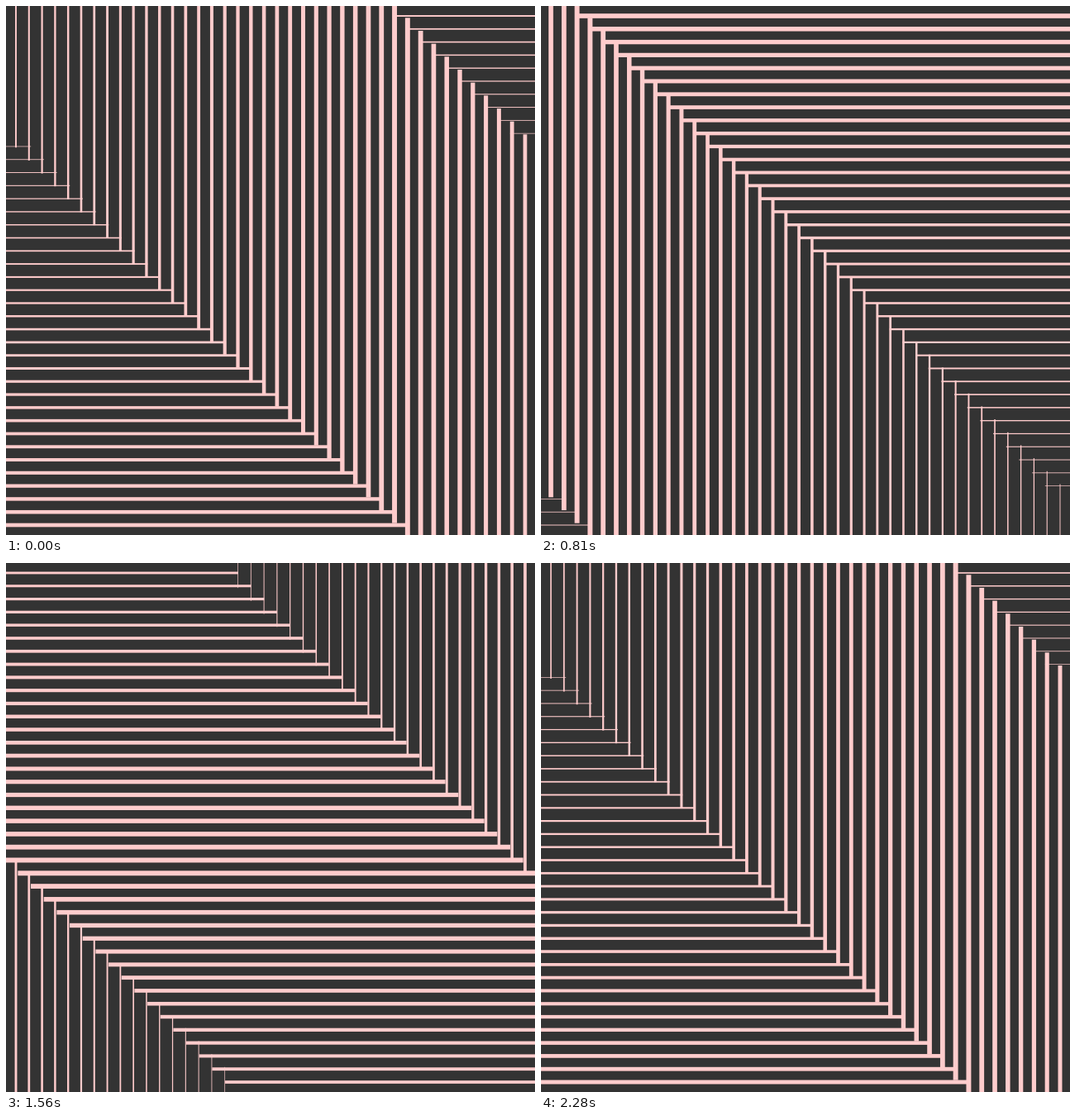
Write an HTML page with a canvas that moves like this. It is 640 px wide and 640 px high and loops after 2310 ms.

```html
<!DOCTYPE html>
<html lang="en">
<head>
<meta charset="utf-8">
<title>Woven lines</title>
<style>
  html, body { margin: 0; width: 100%; height: 100%; overflow: hidden; background: #333; }
  canvas { display: block; width: 640px; height: 640px; }
</style>
</head>
<body>
<canvas id="stage" width="640" height="640"></canvas>
<script>
const ctx = document.getElementById('stage').getContext('2d');

const COUNT = 40;
const MARGIN = 12;
const GAP = (640 - 2 * MARGIN) / (COUNT - 1);
const CYCLE = 2 * (COUNT - 1);
const STEP_MS = 30;
const STEPS = 77;

const THICK = 6;
const THIN = 0.6;

const at = cell => MARGIN + cell * GAP;

// Fold a cell offset into one cycle centred on zero.
const wrap = v => ((v + CYCLE / 2) % CYCLE + CYCLE) % CYCLE - CYCLE / 2;

// One line, 40 cells long: thickest and shortest when centred on the stage.
function bar(index, shift, vertical) {
  const offset = wrap(shift);
  const w = THICK - (THICK - THIN) * Math.abs(offset) / (COUNT - 1);
  const extra = 3 - 0.9 * w;
  const length = COUNT * GAP + 2 * extra;
  const side = at(index) - w / 2;
  const start = 320 + offset * GAP - length / 2;
  if (vertical) ctx.fillRect(side, start, w, length);
  else ctx.fillRect(start, side, length, w);
}

function draw(step) {
  ctx.fillStyle = '#333';
  ctx.fillRect(0, 0, 640, 640);
  ctx.fillStyle = '#ffcccc';
  for (let i = 0; i < COUNT; i++) {
    bar(i, i + step - 29.5, true);
    bar(i, i - step + 29.5, false);
  }
}

const origin = performance.now();

function tick() {
  const elapsed = Math.max(0, performance.now() - origin);
  draw(Math.floor(elapsed / STEP_MS) % STEPS);
  requestAnimationFrame(tick);
}

draw(0);
requestAnimationFrame(tick);
</script>
</body>
</html>
```
